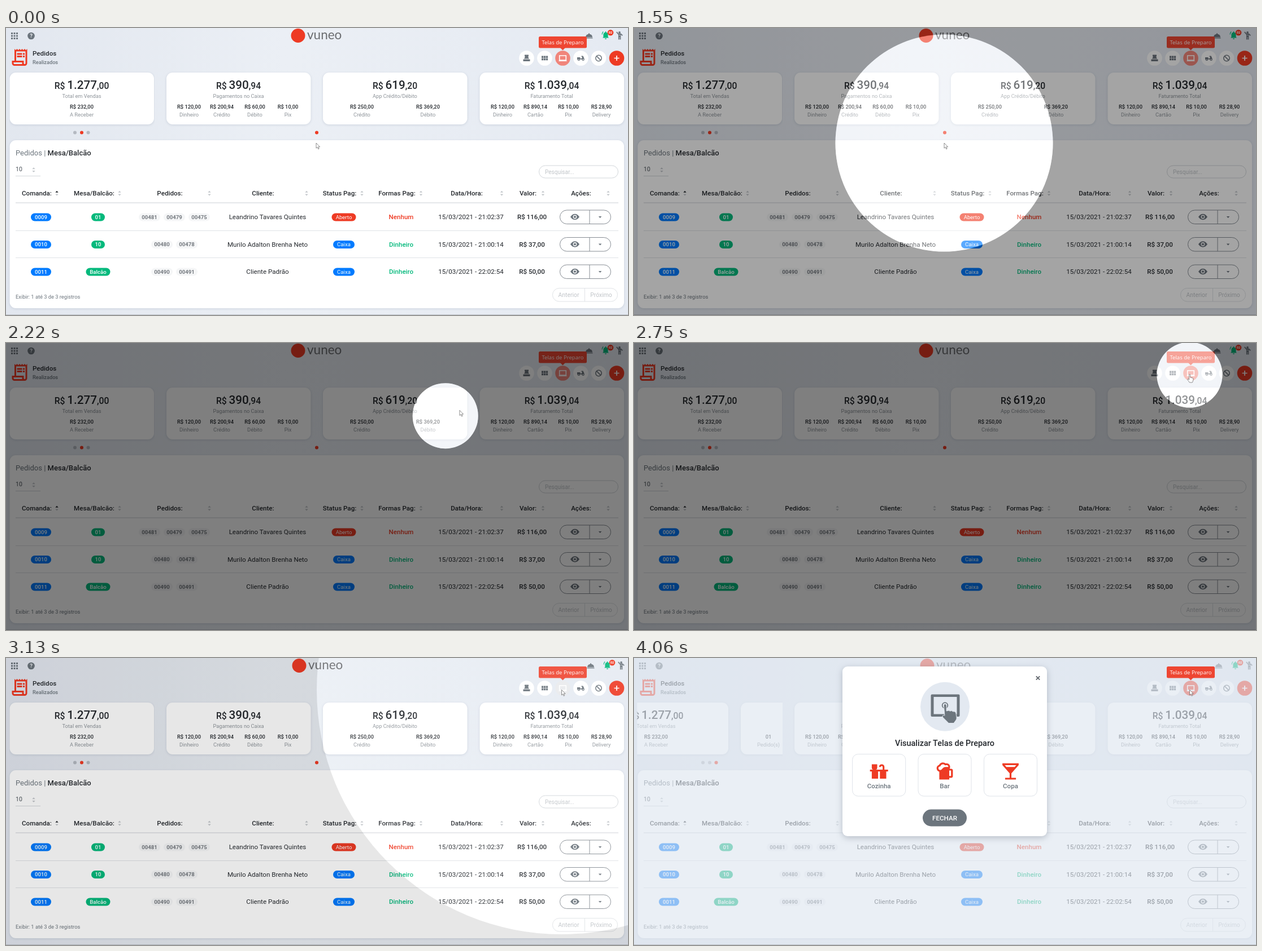
An HTML page for the animation above (4.13 s loop, 1101x509 px).

```html
<!DOCTYPE html>
<html lang="pt-BR">
<head>
<meta charset="utf-8">
<title>Pedidos</title>
<style>
html, body { margin: 0; width: 100%; height: 100%; overflow: hidden; background: #e6ebf2; }
svg { display: block; width: 100%; height: 100%; font-family: Roboto, "Open Sans", sans-serif; }
.card { fill: #fff; filter: drop-shadow(0 1px 2px rgba(60, 80, 110, .16)); }
.dialog { fill: #fff; filter: drop-shadow(0 3px 6px rgba(40, 50, 70, .26)); }
</style>
</head>
<body>
<svg id="stage" viewBox="0 0 1101 509" xmlns="http://www.w3.org/2000/svg"></svg>
<script>
const RED = '#ee3b24', GREEN = '#04b97c', BLUE = '#007bff', GRAY = '#6c757d', DARK = '#24282d', SOFT = '#8d9399';
const LOOP = 4130;

// Shape helpers; text is placed by the middle of its capitals.
const text = (x, y, s, size, fill = DARK, weight = 400, anchor = 'middle', more = '') =>
  `<text x="${x}" y="${y + size * .355}" font-size="${size}" fill="${fill}" font-weight="${weight}" text-anchor="${anchor}" ${more}>${s}</text>`;
const rect = (x, y, w, h, r, fill, more = '') =>
  `<rect x="${x}" y="${y}" width="${w}" height="${h}" rx="${r}" fill="${fill}" ${more}/>`;
const disc = (x, y, r, fill, more = '') => `<circle cx="${x}" cy="${y}" r="${r}" fill="${fill}" ${more}/>`;
const path = (d, fill, more = '') => `<path d="${d}" fill="${fill}" ${more}/>`;
const stroke = (d, color, w = 1, more = '') => path(d, 'none', `stroke="${color}" stroke-width="${w}" ${more}`);
const group = (id, body, more = '') => `<g id="${id}" ${more}>${body}</g>`;
const at = (x, y, body, scale = 1) => `<g transform="translate(${x} ${y}) scale(${scale})">${body}</g>`;
const pill = (x, y, w, s, fill, color = '#fff', weight = 500) =>
  rect(x - w / 2, y - 6.5, w, 14, 7, fill) + text(x, y + .5, s, 9.6, color, weight);

function topBar() {
  let grid = '';
  for (let i = 0; i < 9; i++) grid += rect(9 + i % 3 * 4.5, 8 + Math.floor(i / 3) * 4.5, 3, 3, .5, GRAY);
  const brand = disc(517, 13.5, 12.5, RED) +
    '<text x="533" y="20" font-size="22.5" fill="#6b6d70" font-family="Lato, sans-serif">vuneo</text>';
  const tray = path('M1025.5 18.5h13v-1.3h-13zM1026 16.4a6 6 0 0 1 5-5.7v-1.2h2v1.2a6 6 0 0 1 5 5.7z', GRAY);
  const bell = path('M1056 17.5l1.4-1.6v-4a4.2 4.2 0 0 1 3.2-4.2v-1.4h1.8v1.4a4.2 4.2 0 0 1 3.2 4.2v4l1.4 1.6zM1060 18.4h3a1.5 1.5 0 0 1-3 0z', GREEN) +
    stroke('M1055 11.5q0-3 2.2-5', GREEN, 1.2) +
    disc(1070, 8.3, 5.3, RED) + text(1070, 8.3, '02', 5.6, '#fff', 700);
  const person = disc(1086, 8, 1.9, GRAY) +
    stroke('M1080.8 7l3 3.7h4.6l2.8 2.6M1084.8 11v9.6M1087.4 11v9.6M1084.8 15h2.6', GRAY, 1.8);
  return grid + disc(44.5, 14, 6.3, GRAY) + text(44.5, 14, '?', 9.5, '#eef1f5', 700) +
    group('brand', brand) + group('tools', tray + bell + person);
}

function heading() {
  const receipt = path('M19.5 3.5L18 2l-1.5 1.5L15 2l-1.5 1.5L12 2l-1.5 1.5L9 2 7.5 3.5 6 2v14H3v3c0 1.66 1.34 3 3 3h12c1.66 0 3-1.34 3-3V2zM15 20H6c-.55 0-1-.45-1-1v-1h10zM19 19c0 .55-.45 1-1 1s-1-.45-1-1v-3H8V5h11zM9 7h6v2H9zM16 7h2v2h-2zM9 10h6v2H9zM16 10h2v2h-2z', RED, 'fill-rule="evenodd"');
  return at(6, 34, receipt, 1.5) + text(47, 45, 'Pedidos', 11.6, DARK, 500, 'start') +
    text(47, 60.5, 'Realizados', 9.2, GRAY, 500, 'start');
}

function buttons() {
  const y = 53.5, xs = [921.5, 953.5, 985.5, 1017.5, 1049, 1081];
  const wheel = x => disc(x, 2.2, 1.7, 'none', `stroke="${GRAY}" stroke-width="1.3"`);
  let tiles = '';
  for (let i = 0; i < 6; i++) tiles += rect(-5.5 + i % 3 * 3.9, -4 + (i > 2 ? 4.2 : 0), 3.3, 3.6, 0, GRAY);
  const icons = [
    path('M-3.5-6h7v3h-1l1.8 4h-8.6l1.8-4h-1zM-6 2h12v3.5h-12z', GRAY),
    tiles,
    stroke('M-5.8-4.5h11.6v8h-11.6z', '#fff', 1.6) + path('M-7 4.2h14v1.3h-14z', '#fff'),
    wheel(-3.6) + wheel(4) + path('M-6.5-1.5h5.5v2h2.5l1-3h-1.5v-1.5h3l2 4.5-2.5 1.5h-10z', GRAY),
    disc(0, 0, 5.2, 'none', `stroke="${GRAY}" stroke-width="1.5"`) + stroke('M-3.6-3.6l7.2 7.2', GRAY, 1.5),
    stroke('M-4.5 0h9M0-4.5v9', '#fff', 1.7)
  ];
  return xs.map((x, i) =>
    disc(x, y, 13.3, i === 5 ? RED : '#fff', i === 2 ? 'id="screenBtn"' : '') + at(x, y, icons[i])).join('');
}

const money = (x, whole, cents) =>
  `<text x="${x}" y="107.5" font-size="15.7" fill="${DARK}" font-weight="500" text-anchor="middle">R$ <tspan font-size="20.7">${whole}</tspan>,${cents}</text>`;
const column = (x, value, label) => text(x, 140, value, 9.3, DARK, 500) + text(x, 153.5, label, 9.3, SOFT);
const summary = (x, whole, cents, label, columns) =>
  rect(x, 79, 255.5, 92, 11, '#fff', 'class="card"') + money(x + 127.5, whole, cents) +
  text(x + 127.5, 121, label, 9.25, SOFT) + columns.map(c => column(...c)).join('');

function summaries() {
  const next = rect(284, 79, 255.5, 92, 11, '#fff', 'class="card"') + column(333, '01', 'Pedido(s)');
  const slides = group('slides', summary(6.5, '1.277', '00', 'Total em Vendas', [[134, 'R$ 232,00', 'A Receber']]) + next);
  return `<g clip-path="url(#window)">${slides}</g>` +
    summary(284, '390', '94', 'Pagamentos no Caixa', [[324, 'R$ 120,00', 'Dinheiro'], [382, 'R$ 200,94', 'Crédito'], [440.5, 'R$ 60,00', 'Débito'], [499, 'R$ 10,00', 'Pix']]) +
    summary(561, '619', '20', 'App Crédito/Débito', [[630, 'R$ 250,00', 'Crédito'], [747, 'R$ 369,20', 'Débito']]) +
    summary(838.5, '1.039', '04', 'Faturamento Total', [[879, 'R$ 120,00', 'Dinheiro'], [937, 'R$ 890,14', 'Cartão'], [995.5, 'R$ 10,00', 'Pix'], [1054, 'R$ 28,90', 'Delivery']]) +
    [122, 134, 145.5].map((x, i) => disc(x, 185.5, 3, '#b4b9c1', `id="dot${i}"`)).join('') + disc(550, 185.5, 3, RED);
}

const sorter = (x, y, up = '#c3c7cb') =>
  path(`M${x - 2.7} ${y - 1.3}l2.7-3 2.7 3z`, up) + path(`M${x - 2.7} ${y + 1.5}l2.7 3 2.7-3z`, '#c3c7cb');

function row(y, code, place, placeW, orders, client, status, statusW, paid, date, value) {
  const open = status === 'Aberto';
  const first = 298 - (orders.length - 1) * 22;
  return pill(62, y, 36, code, BLUE) + pill(163, y, placeW, place, GREEN) +
    orders.map((o, i) => pill(first + i * 44, y, 38, o, '#f5f6f7', '#74797f', 700)).join('') +
    text(463, y, client, 11.6) + pill(598, y, statusW, status, open ? RED : BLUE, '#fff', 400) +
    text(699.5, y, paid, 11.6, open ? RED : GREEN, 500) + text(823, y, date, 11.6) + text(931, y, value, 11.6, DARK, 500) +
    rect(980.5, y - 12, 90, 24.5, 12.2, '#fff', 'stroke="#868c93"') + stroke(`M1033 ${y - 12}v24.5`, '#868c93') +
    path(`M999 ${y}q3.5-5.2 8-5.2t8 5.2q-3.5 5.2-8 5.2t-8-5.2z`, GRAY) +
    disc(1007, y, 3.4, '#fff') + disc(1007, y, 2.1, GRAY) + path(`M1048.8 ${y - 1}h5.6l-2.8 3z`, GRAY);
}

function table() {
  const heads = [[54.5, 'Comanda:', 90], [156, 'Mesa/Balcão:', 201], [290, 'Pedidos:', 360], [455, 'Cliente:', 532], [590.5, 'Status Pag:', 630],
    [692, 'Formas Pag:', 734.5], [815.5, 'Data/Hora:', 877.5], [924, 'Valor:', 950.5], [1018, 'Ações:', 1066]];
  const pale = '#c0c4c8';
  return rect(6.5, 199, 1087.5, 298, 11, '#fff', 'class="card"') +
    text(17, 221, `Pedidos | <tspan fill="${DARK}" font-weight="500">Mesa/Balcão</tspan>`, 13, GRAY, 400, 'start') +
    text(17, 250.5, '10', 10.5, '#495057', 400, 'start') + sorter(49, 251.5) + stroke('M17 262.5h44', '#d3d7db') +
    rect(943.5, 244, 140, 22, 11, '#fff', 'stroke="#d2d6da"') + text(954, 255, 'Pesquisar...', 10, pale, 400, 'start') +
    heads.map(([x, s, sx], i) => text(x, 292.5, s, 11.6, DARK, 500) + sorter(sx, 293, i ? undefined : DARK)).join('') +
    stroke('M17 310h1067', '#dcdfe3', 1.5) + stroke('M17 359.5h1067M17 407.5h1067', '#dfe2e6') +
    row(335, '0009', '01', 24, ['00481', '00479', '00475'], 'Leandrino Tavares Quintes', 'Aberto', 43, 'Nenhum', '15/03/2021 - 21:02:37', 'R$ 116,00') +
    row(383.5, '0010', '10', 24, ['00480', '00478'], 'Murilo Adalton Brenha Neto', 'Caixa', 38, 'Dinheiro', '15/03/2021 - 21:00:14', 'R$ 37,00') +
    row(432, '0011', 'Balcão', 43, ['00490', '00491'], 'Cliente Padrão', 'Caixa', 38, 'Dinheiro', '15/03/2021 - 22:02:54', 'R$ 50,00') +
    text(17, 477, 'Exibir: 1 até 3 de 3 registros', 9.3, GRAY, 400, 'start') +
    rect(967.5, 461.5, 115, 23.5, 11.7, '#fff', 'stroke="#e0e3e6"') + stroke('M1024.5 461.5v23.5', '#e0e3e6') +
    text(996, 473.5, 'Anterior', 10.4, pale) + text(1053.5, 473.5, 'Próximo', 10.4, pale);
}

const tooltip = () => rect(943, 15, 85, 20.5, 2.5, '#ee4632') + path('M981 35l4.5 4.5 4.5-4.5z', '#ee4632') +
  text(985.5, 25.2, 'Telas de Preparo', 9.6, '#fff', 400, 'middle', 'font-family="Open Sans, sans-serif"');

function modal() {
  const tablet = path('M527.5 64.5h47a2 2 0 0 1 2 2v35.5a2 2 0 0 1-2 2h-47a2 2 0 0 1-2-2v-35.5a2 2 0 0 1 2-2zM530.5 69v30.5h41V69z', GRAY, 'fill-rule="evenodd"') +
    disc(550.5, 84, 4.8, 'none', `stroke="${GRAY}" stroke-width="1.8"`) +
    path('M548.3 84a2.4 2.4 0 0 1 4.8 0v10l3-.8q2-.6 3 1l2.5-.6q2-.3 2.6 1.4l2.4-.2q2.8.2 3.3 3l1.3 8.2q.2 2.6-1.7 4.8l-3.5 4.8h-9l-10.5-10.5q-1.3-2 .4-3.3 1.4-.8 3 .3z', GRAY, 'stroke="#e3e9f1"');
  const kitchen = path('M22 10h-4V7a3 3 0 0 0-6 0h2a1 1 0 0 1 2 0v3H8a2 2 0 0 0 2-2V4H4v4a2 2 0 0 0 2 2H2v2h2v8h7v-8h2v8h7v-8h2z', RED);
  const mug = path('M19 9h-1.56c.35-.59.56-1.27.56-2 0-2.21-1.79-4-4-4-.34 0-.66.05-.98.13C12.2 2.45 11.15 2 10 2 8.11 2 6.49 3.11 5.73 4.71 4.15 5.26 3 6.74 3 8.5c0 1.86 1.28 3.41 3 3.86V21h11v-2h2a2 2 0 0 0 2-2v-6a2 2 0 0 0-2-2zM7 10.500a2 2 0 0 1-.63-3.88l.8-.27.36-.76C8 4.620 8.940 4 10 4c.79 0 1.390.35 1.740.65l.78.65S13.160 5 14 5a2 2 0 0 1 2 2h-3c-3.330 0-3.850 3.500-6 3.500zM19 17h-2v-6h2z', RED, 'fill-rule="evenodd"');
  const glass = path('M21 5V3H3v2l8 9v5H6v2h12v-2h-5v-5zM7.43 7L5.66 5h12.69l-1.78 2z', RED, 'fill-rule="evenodd"');
  const option = (x, icon, label) => rect(x - 47, 170.5, 94, 74.5, 10, '#fff', 'stroke="#dfe3e9"') +
    at(x - 19.2, 182, icon, 1.6) + text(x, 227, label, 11.5, GRAY, 500);
  return rect(369, 15, 362, 301, 9, '#fff', 'class="dialog"') +
    stroke('M711.8 32.3l6.4 6.4M718.2 32.3l-6.4 6.4', '#63686e', 1.9) +
    disc(550.5, 86.3, 43.5, '#e3e9f1') + tablet +
    text(550, 150.5, 'Visualizar Telas de Preparo', 14.45, DARK, 500) +
    option(433.7, kitchen, 'Cozinha') + option(550, mug, 'Bar') + option(666.5, glass, 'Copa') +
    rect(511, 268.5, 78, 30, 15, GRAY) + text(550, 283.7, 'FECHAR', 11.6, '#fff', 500);
}

const OUTLINE = 'stroke="#444" stroke-width=".6"';
const ARROW = path('M0 0v9.2l2.1-1.9 1.6 3.5 1.5-.7-1.5-3.3h2.9z', '#fff', OUTLINE);
const HAND = path('M-.9 0a1 1 0 0 1 2 0v4.5l4 1q1.6.5 1.4 2.2l-.7 3.5q-.2 1.3-1 2.3h-5q-1.5-2.5-3.3-4.6-.8-1.4.5-1.7l2.1 1.3z', '#fff', OUTLINE);

const $ = id => document.getElementById(id);
const set = (id, attrs) => { for (const k in attrs) $(id).setAttribute(k, attrs[k]); };

$('stage').innerHTML = `<defs>
  <clipPath id="window"><rect x="5.5" y="74" width="257.5" height="104"/></clipPath>
  <linearGradient id="sky"><stop stop-color="#e2e7ef"/><stop offset=".45" stop-color="#ebeff5"/><stop offset="1" stop-color="#e5eaf2"/></linearGradient></defs>` +
  rect(0, 0, 1101, 509, 0, 'url(#sky)') + topBar() + heading() + buttons() + summaries() + table() +
  rect(0, 0, 1101, 509, 0, '#dee6f0', 'id="backdrop"') + rect(0, 508, 1101, 1, 0, '#bdc2c9') +
  tooltip() + group('modal', modal()) +
  path('', '#000', 'id="shade" fill-rule="evenodd"') + disc(0, 0, 0, '#fff', 'id="light"') +
  group('trail', disc(550, 185.5, 3, '#7f8184') + at(549, 204, `<g opacity=".2">${ARROW}</g>`)) +
  group('cursor', group('arrow', ARROW) + group('hand', HAND));

const clamp = x => Math.min(1, Math.max(0, x));
const mix = (a, b, k) => a + (b - a) * k;

// CSS-like cubic Bezier easing, solved by bisection.
function bezier(x1, y1, x2, y2) {
  const f = (a, b, s) => 3 * a * s * (1 - s) ** 2 + 3 * b * s * s * (1 - s) + s ** 3;
  return x => {
    x = clamp(x);
    if (x === 0 || x === 1) return x;
    let lo = 0, hi = 1;
    for (let i = 0; i < 24; i++) {
      const m = (lo + hi) / 2;
      if (f(x1, x2, m) < x) lo = m; else hi = m;
    }
    return f(y1, y2, lo);
  };
}
const zoom = bezier(.41, .52, 0, .94);
const easeOut = bezier(0, 0, .58, 1);
const glide = bezier(.33, .41, .67, .92);

const BURSTS = [[0, 0, 1], [1470, 1470, 1], [1550, 1880, 6], [1950, 1950, 1], [2020, 2490, 8], [2560, 2750, 4],
  [2950, 3130, 3], [3190, 3410, 4], [3480, 3530, 2], [3600, 3660, 2], [3990, 4060, 2]];
function snap(t) {
  const [a, b, n] = BURSTS.filter(r => r[0] <= t).pop();
  if (n < 2) return a;
  const d = (b - a) / (n - 1);
  return a + Math.min(n - 1, Math.floor((t - a) / d + 1e-6)) * d;
}

const TRACK = [[1847, 549, 204], [1880, 559, 201.5], [1950, 613, 193], [2490, 956, 60], [2750, 983.5, 56.5]];
function track(t) {
  if (t <= TRACK[0][0]) return TRACK[0].slice(1);
  for (let i = 1; i < TRACK.length; i++) {
    const [t0, x0, y0] = TRACK[i - 1], [t1, x1, y1] = TRACK[i];
    if (t > t1) continue;
    let k = (t - t0) / (t1 - t0);
    if (i === 3) k = glide(k);
    if (i === 4) k = easeOut(k);
    return [mix(x0, x1, k), mix(y0, y1, k)];
  }
  return TRACK[4].slice(1);
}

function render(time) {
  const t = snap(time);

  const p = zoom((t - 1402) / 500) - zoom((t - 2947) / 500);
  const [x, y] = track(t), r = mix(522, 58, p);
  const ring = `M${x - r} ${y}a${r} ${r} 0 1 0 ${2 * r} 0a${r} ${r} 0 1 0 ${-2 * r} 0z`;
  set('shade', { d: 'M0 0H1101V509H0z' + ring, opacity: p / 2 });
  set('light', { cx: x, cy: y, r, opacity: p / 2 });

  const [cx, cy] = track(t + 33), hand = t > 2600 && t < 3000;
  set('cursor', { transform: `translate(${cx} ${cy})` });
  set('arrow', { opacity: hand ? 0 : 1 });
  set('hand', { opacity: hand ? 1 : 0 });
  set('trail', { opacity: t > 1870 && t < 1940 ? 1 : 0 });

  const opened = t > 3100;
  set('brand', { transform: `translate(${opened ? 2 : 0})` });
  set('tools', { transform: `translate(${opened ? 3 : 0})` });
  set('screenBtn', { fill: t < 3020 ? '#f0857b' : t < 3220 ? '#e9eaec' : RED });
  set('backdrop', { opacity: .64 * clamp((t - 3150) / 150) });
  set('modal', {
    opacity: clamp((t - 3315) / 150),
    transform: `translate(0 ${-50 * (1 - easeOut((t - 3315) / 300))})`
  });

  const shift = Math.max(0, t - 3965), active = shift ? 2 : 1;
  set('slides', { transform: `translate(${-shift})` });
  for (let i = 0; i < 3; i++) set('dot' + i, { fill: i === active ? RED : '#b4b9c1' });
}

const start = performance.now();
function tick() {
  render((performance.now() - start) % LOOP);
  requestAnimationFrame(tick);
}
tick();
</script>
</body>
</html>
```
